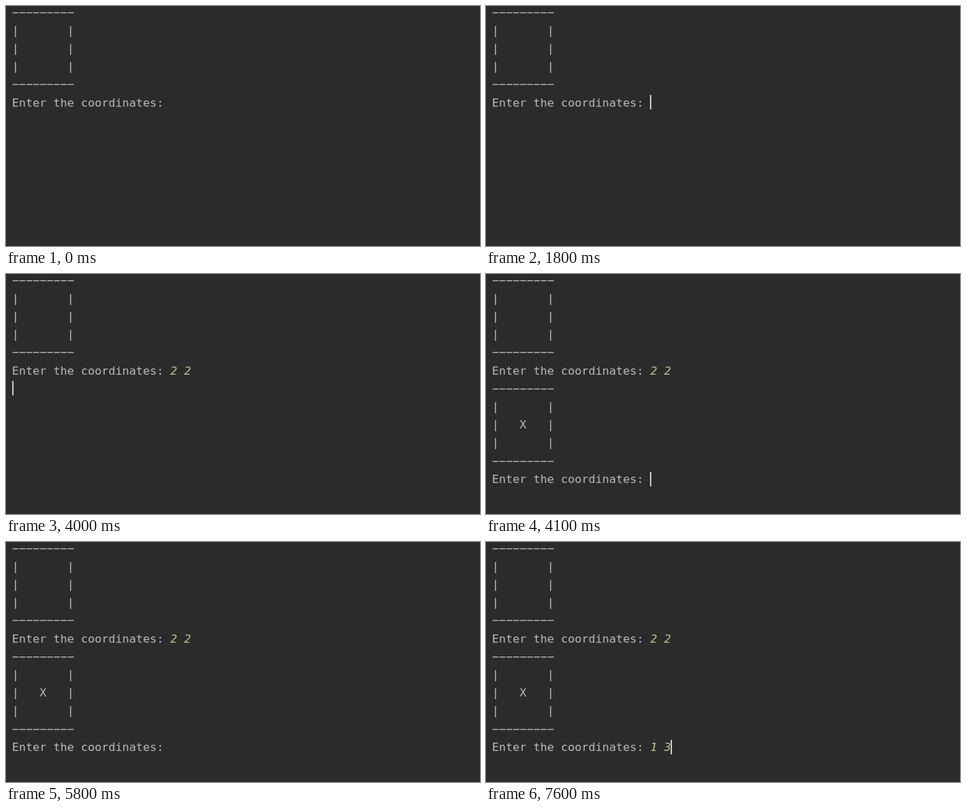
Animation, 688 px wide and 348 px high, one loop 8 s. Source, as an HTML page:

```html
<!DOCTYPE html>
<html lang="en">
<head>
<meta charset="utf-8">
<title>Tic-tac-toe console</title>
<style>
  html, body { margin: 0; width: 100%; height: 100%; overflow: hidden; background: #2b2b2b; }
  svg { display: block; width: 688px; height: 348px; }
  text { font: 16.61px "DejaVu Sans Mono", monospace; fill: #bbbbbb; white-space: pre; }
  .input { font-style: italic; fill: #c3c387; }
  .caret { fill: #cccccc; }

  .caret, .timed { animation: 8s step-end infinite; }
  .caret { animation-name: caret; }
  .first-a { animation-name: first-a; }
  .first-b { animation-name: first-b; }
  .board { animation-name: board; }
  .second-a { animation-name: second-a; }
  .second-b { animation-name: second-b; }

  @keyframes first-a { 0% { opacity: 0 } 27.5%, 100% { opacity: 1 } }
  @keyframes first-b { 0% { opacity: 0 } 46.25%, 100% { opacity: 1 } }
  @keyframes board { 0% { opacity: 0 } 51.25%, 100% { opacity: 1 } }
  @keyframes second-a { 0% { opacity: 0 } 88.75%, 100% { opacity: 1 } }
  @keyframes second-b { 0% { opacity: 0 } 95%, 100% { opacity: 1 } }

  @keyframes caret {
    0%     { opacity: 0; transform: translate(238px, 129px) }
    10%    { opacity: 1; transform: translate(238px, 129px) }
    16.25% { opacity: 0; transform: translate(238px, 129px) }
    22.5%  { opacity: 1; transform: translate(238px, 129px) }
    27.5%  { opacity: 1; transform: translate(248px, 129px) }
    32.5%  { opacity: 0; transform: translate(248px, 129px) }
    33.75% { opacity: 1; transform: translate(258px, 129px) }
    41.25% { opacity: 0; transform: translate(258px, 129px) }
    46.25% { opacity: 1; transform: translate(268px, 129px) }
    48.75% { opacity: 0; transform: translate(268px, 129px) }
    /* new line, then the next prompt */
    50%    { opacity: 1; transform: translate(9px, 155px) }
    51.25% { opacity: 1; transform: translate(238px, 287px) }
    60%    { opacity: 0; transform: translate(238px, 287px) }
    66.25% { opacity: 1; transform: translate(238px, 287px) }
    72.5%  { opacity: 0; transform: translate(238px, 287px) }
    80%    { opacity: 1; transform: translate(238px, 287px) }
    86.25% { opacity: 0; transform: translate(238px, 287px) }
    88.75% { opacity: 1; transform: translate(248px, 287px) }
    92.5%  { opacity: 1; transform: translate(258px, 287px) }
    95%, 100% { opacity: 1; transform: translate(268px, 287px) }
  }
</style>
</head>
<body>
<svg viewBox="0 0 688 348">
  <g>
    <text x="8.7" y="15">−−−−−−−−−</text>
    <text x="8.7" y="41">|       |</text>
    <text x="8.7" y="67">|       |</text>
    <text x="8.7" y="93">|       |</text>
    <text x="8.7" y="119">−−−−−−−−−</text>
    <text x="8.7" y="146">Enter the coordinates:</text>
  </g>
  <text class="input timed first-a" x="238.6" y="146">2</text>
  <text class="input timed first-b" x="258.6" y="146">2</text>

  <g class="timed board">
    <text x="8.7" y="172">−−−−−−−−−</text>
    <text x="8.7" y="198">|       |</text>
    <text x="8.7" y="224">|   X   |</text>
    <text x="8.7" y="250">|       |</text>
    <text x="8.7" y="277">−−−−−−−−−</text>
    <text x="8.7" y="303">Enter the coordinates:</text>
  </g>
  <text class="input timed second-a" x="238.6" y="303">1</text>
  <text class="input timed second-b" x="258.6" y="303">3</text>

  <rect class="caret" width="2" height="21"/>
</svg>
</body>
</html>
```
